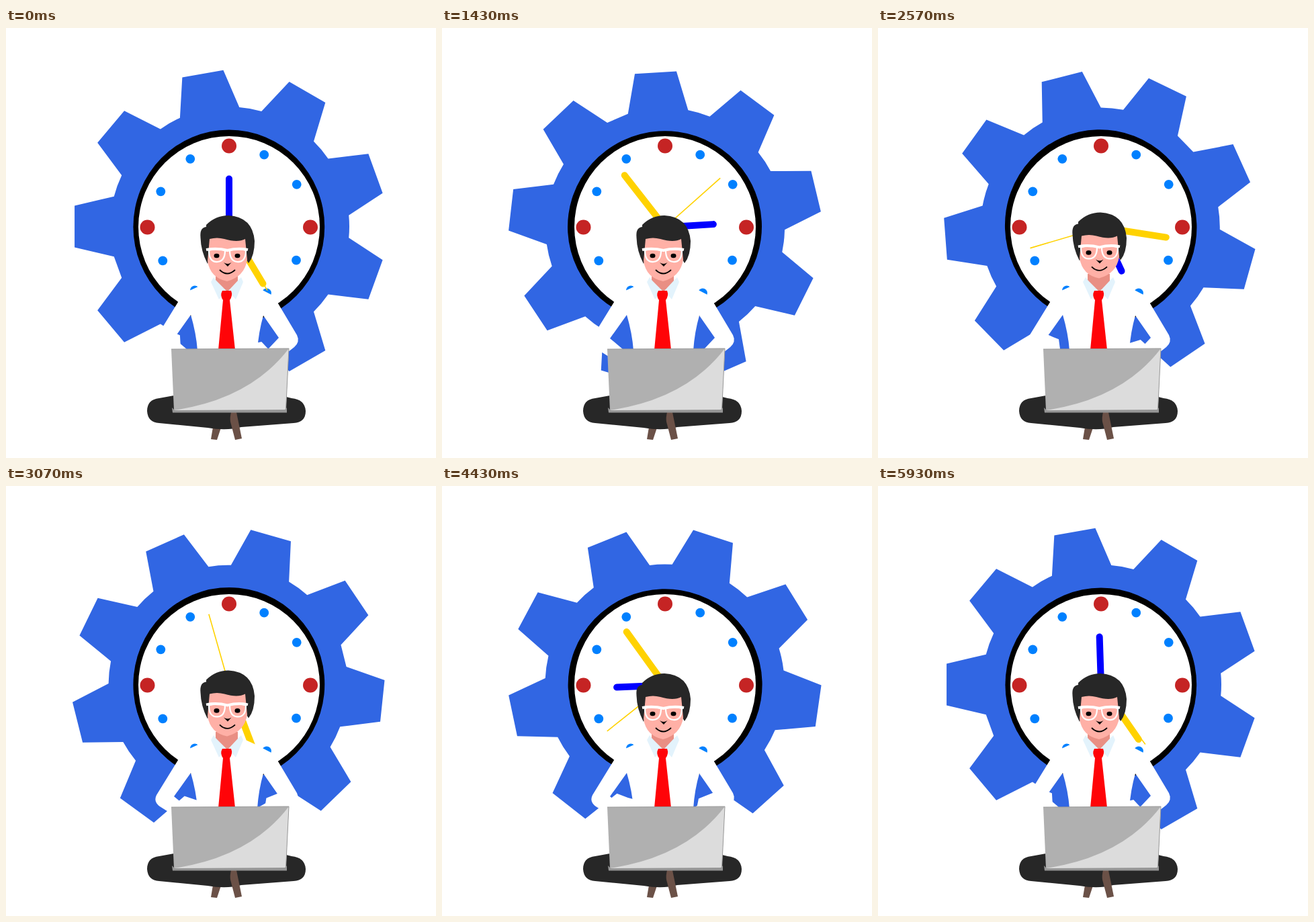
Animation of 640 by 640 pixels, one loop 6000 ms. Source, as an HTML page:

```html
<!DOCTYPE html>
<html lang="en">
<head>
<meta charset="utf-8">
<title>Working around the clock</title>
<style>
  html, body { margin: 0; width: 100%; height: 100%; overflow: hidden; background: #fff; }
  svg { display: block; width: 100vw; height: 100vh; }
</style>
</head>
<body>
<svg viewBox="0 0 640 640">
  <g id="gear">
    <path id="cog" fill="#3166e3"/>
    <ellipse cx="331.8" cy="296" rx="142.4" ry="144.5"/>
  </g>
  <circle cx="332" cy="296" r="135" fill="#fff"/>
  <g id="dots"></g>

  <g stroke-linecap="round" stroke-width="10">
    <path id="second" d="M332 296.5V186.5" stroke="#ffd200" stroke-width="1.6" stroke-linecap="butt"/>
    <path id="minute" d="M332 296.5V198.5" stroke="#ffd200"/>
    <path id="hour" d="M332 296.5V224.5" stroke="#00f"/>
  </g>

  <g fill="#fff">
    <path d="M309 372L288 384L275 390Q266 396 256 408L275 427Q283 454 285 480H374Q376 452 383 428L405 410Q400 402 395 397L370 384L350 375Z"/>
    <path d="M275 390L256 408L224 460Q219 470 229 477L248 489H278L269 478L250 462L275 427Z"/>
    <path id="rightArm"/>
  </g>

  <path d="M312 366V377L327 391H333L345 377V366Z" fill="#e98f84"/>
  <path d="M309 371L305 378L317 404L328 391L313 376ZM350 371L353 378L342 404L331 391L345 376Z" fill="#e3f3fc"/>
  <path d="M322 391H335Q338 398 333 405L341 479H316L323 405Q318 398 322 391Z" fill="#ff0408"/>

  <g id="head">
    <path d="M300 351Q290 332 289.500 312Q288 297 298 296V293Q312 279 331 279Q367 281 370 317Q370 339 361 350L355 340H304Z" fill="#272727"/>
    <path d="M303 314Q314 311 325 314Q345 320 356 314L359 345Q355 370 329 377Q304 372 300 347Z" fill="#ffb0a6"/>
    <ellipse cx="313.500" cy="339" rx="4" ry="3.300"/>
    <ellipse cx="344.500" cy="339" rx="4" ry="3.300"/>
    <g fill="none" stroke="#fff" stroke-width="2.200">
      <path d="M302 331Q314 327 326 331Q326 347 315 348Q302 349 302 331ZM333 331Q345 327 357 331Q357 349 344 348Q333 347 333 331Z"/>
      <path d="M298 330Q314 327 329.500 331Q345 327 360 330" stroke-width="4"/>
    </g>
    <path d="M324 349Q330 353 335.500 349L330 355Z"/>
    <path d="M318 360Q329 371 341 360" fill="none" stroke="#000" stroke-width="1.800"/>
  </g>

  <path d="M308 594L305 612L314 613L320 595Z" fill="#6b5147"/>
  <path d="M250 547L228 551Q210 553 210 570Q211 587 228 588L300 595Q328 600 350 594L428 588Q446 587 446 570Q445 553 425 551L417 549Z" fill="#272727"/>
  <path d="M335 572Q333 580 334 586L341 613L351 611L343 572Z" fill="#6b5147"/>

  <path d="M246 478L421 477L416.500 569H250Z" fill="#b0b0b0"/>
  <path d="M421 477Q364 552 250 569H416.500Z" fill="#dcdcdc"/>
  <path d="M246 478L421 477L416.500 569" fill="none" stroke="#999"/>
  <path d="M247 565L251 569L415 568L418 565V572.500H248Z" fill="#969696"/>
</svg>
<script>
  const $ = id => document.getElementById(id);
  const LOOP = 6000, FRAMES = 84, STEP = LOOP / FRAMES;
  const GEAR_TURN = 4.325; // degrees per frame
  const TICKS_PER_FRAME = 30 / 14, TICK_TURN = 2.012; // the hands move in 1/30 s ticks

  function polar(radius, degrees) {
    const a = degrees * Math.PI / 180;
    return (333 + radius * Math.cos(a)).toFixed(2) + ' ' + (295.5 + radius * Math.sin(a)).toFixed(2);
  }

  function cogPath() {
    let d = '';
    for (let a = -180; a < 180; a += 40) {
      d += (d ? 'A178 178 0 0 1 ' : 'M') + polar(178, a - 14.6) +
        'L' + polar(233, a - 7.65) + 'L' + polar(233, a + 7.65) + 'L' + polar(178, a + 14.6);
    }
    return d + 'Z';
  }

  function addDots(points, radius, color) {
    $('dots').innerHTML += points.map(([x, y]) =>
      `<circle cx="${x}" cy="${y}" r="${radius}" fill="${color}"/>`).join('');
  }

  const rotate = (id, degrees, cx = 332, cy = 296.5) =>
    $(id).setAttribute('transform', `rotate(${degrees} ${cx} ${cy})`);

  function render(time) {
    const frame = Math.floor((time % LOOP + 5) / STEP) % FRAMES;
    const turn = Math.round(frame * TICKS_PER_FRAME) * TICK_TURN;

    // The gear closes its full turn one frame before the loop ends.
    rotate('gear', frame % (FRAMES - 1) * GEAR_TURN, 331.8, 295.7);
    rotate('hour', turn);
    rotate('minute', 149 + 2 * turn);
    rotate('second', 148.8 + 3 * turn);

    const nod = frame / FRAMES * 10 % 1;
    const lifted = nod > 0.06 && nod < 0.345;
    $('head').setAttribute('transform', `translate(0 ${lifted ? -4.6 : 0})`);

    const press = frame / FRAMES * 5 % 1;
    const wrist = press < 0.45 || press > 0.9 ? '390 478' : '376 478';
    $('rightArm').setAttribute('d',
      `M395 397L405 410L433 457Q438 467 429 475L420 482H390L${wrist}L406 461L383 428Z`);
  }

  $('cog').setAttribute('d', cogPath());
  addDots([[332, 175.5], [453, 296.5], [210.5, 296.5]], 11, '#c52424');
  addDots([[384.2, 188.7], [432.7, 232.8], [432, 345.7], [388, 394.5],
    [281, 390.5], [233.3, 346.4], [230.3, 243.3], [274.3, 194.8]], 6.9, '#0080ff');

  const start = performance.now();
  function tick() {
    render(performance.now() - start);
    requestAnimationFrame(tick);
  }
  tick();
</script>
</body>
</html>
```
